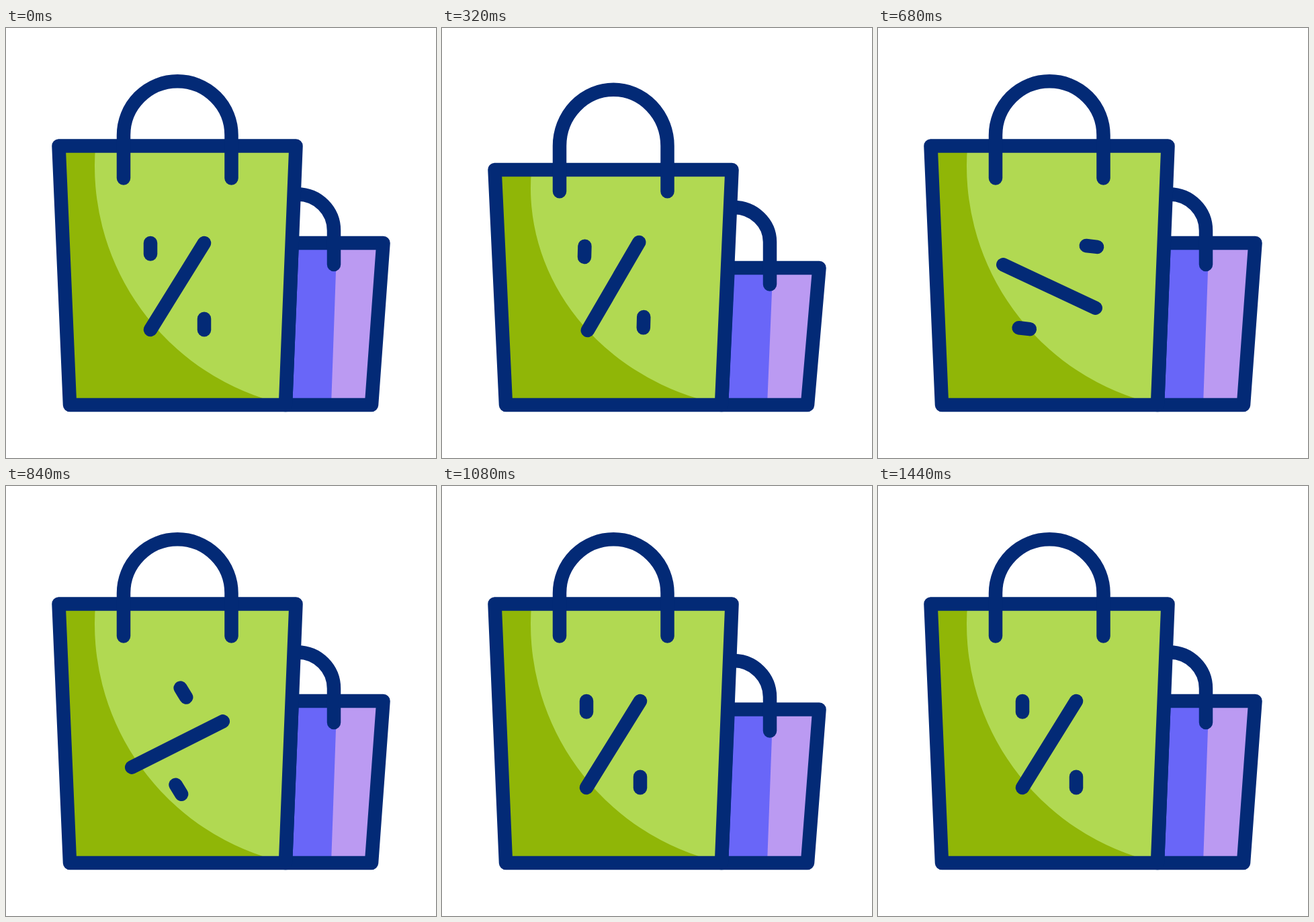
Recreate the animation shown at these times as an HTML page. Size 640x640 px, loop 1.48 s.

```html
<!DOCTYPE html>
<html lang="en">
<head>
<meta charset="utf-8">
<title>Shopping bags</title>
<style>
  html, body { margin: 0; width: 100%; height: 100%; overflow: hidden; background: #fff; }
  svg { display: block; width: 640px; height: 640px; }
  .line { fill: none; stroke: #032a76; stroke-width: 20.5; stroke-linecap: round; stroke-linejoin: round; }
  .fixed { vector-effect: non-scaling-stroke; }
  .spark { fill: none; stroke: #b1d952; stroke-width: 21.5; stroke-linecap: round; }
</style>
</head>
<body>
<svg viewBox="0 0 640 640">
  <g id="smallBody">
    <path fill="#6966f8" d="M425.7 320H561.5L544 561H416Z"/>
    <path fill="#bb9af2" d="M492.5 320H561.5L544 561H484Z"/>
    <path class="line fixed" d="M425.7 320H561.5L544 561H416Z"/>
  </g>
  <path id="smallHandle" class="line"/>
  <g id="bigBody">
    <path fill="#b1d952" d="M78.5 175.5H431.5L416 561H95Z"/>
    <path fill="#90b607" d="M78.5 175.5H133.2A364 364 0 0 0 382 551L408 561H95Z"/>
    <path class="line fixed" d="M78.5 175.5H431.5L416 561H95Z"/>
  </g>
  <path id="bigHandle" class="line"/>
  <g id="percent">
    <path id="slash" class="line" d="M295 320L215 449"/>
    <path id="dotA" class="line" d="M0 -8.2V8.2"/>
    <path id="dotB" class="line" d="M0 -8.2V8.2"/>
  </g>
  <g id="sparks"></g>
</svg>
<script>
const LOOP = 1480, STEP = 40;
const $ = id => document.getElementById(id);
const set = (id, name, value) => $(id).setAttribute(name, value);

const smooth = u => u * u * (3 - 2 * u);
const out = u => 1 - (1 - u) ** 2;
const ramp = (t, from, to, ease = smooth) =>
  ease(Math.min(1, Math.max(0, (t - from) / (to - from))));
const bump = (t, from, peak, to, fall = smooth) =>
  t < peak ? ramp(t, from, peak) : 1 - ramp(t, peak, to, fall);

// Moves the rim and the base of a bag independently.
function squash(id, rim, base, dRim, dBase) {
  const k = 1 + (dBase - dRim) / (base - rim);
  set(id, 'transform', `matrix(1 0 0 ${k} 0 ${rim + dRim - rim * k})`);
}

function drawBig(t) {
  const jump = -55 * bump(t, 100, 200, 310);
  const lift = -25 * bump(t, 100, 200, 275);
  const land = bump(t, 200, 310, 660, out);
  const slowLand = bump(t, 200, 310, 660);
  squash('bigBody', 175.5, 561, jump + 37.5 * land, lift);

  const top = 79.25 + jump + 12.5 * slowLand;
  const mid = 159.5 + jump + 17 * land;
  const end = 223.5 + jump + 21 * land;
  set('bigHandle', 'd', `M175 ${end}V${mid}A80.25 ${mid - top} 0 0 1 335.5 ${mid}V${end}`);
  set('percent', 'transform', `translate(0 ${lift})`);
}

function drawSmall(t) {
  const shake = bump(t, 220, 320, 430, out);
  const hop = -25 * bump(t, 860, 960, 1170) + 37 * bump(t, 960, 1170, 1440, out);
  const lift = -10.5 * bump(t, 860, 960, 1050);
  squash('smallBody', 320, 561, hop + 37 * shake, lift);

  const top = 247.5 + hop + 19.5 * shake;
  const mid = 301.5 + hop + 17 * shake;
  const end = 352 + hop + 29.5 * shake;
  set('smallHandle', 'd', `M430 ${top}H434A54 ${mid - top} 0 0 1 488 ${mid}V${end}`);
}

// The dots trade places, each pausing halfway.
const upper = [215, 328.3], lower = [295, 441];
const routes = {
  dotA: [upper, [172, 396], [217, 447], [265, 459], lower],
  dotB: [lower, [372, 399], [319, 325.5], [251, 288], upper]
};

function drawPercent(t) {
  const start = 278, half = 660, stop = 1044;
  const angle = 180 * ramp(t, start, stop);
  set('slash', 'transform', `rotate(${-angle} 255 384.5)`);

  const u = t < half ? ramp(t, start, half) : ramp(t, half, stop);
  for (const id in routes) {
    const [a, b, c] = routes[id].slice(t < half ? 0 : 2);
    const [x, y] = [0, 1].map(k => (1 - u) ** 2 * a[k] + 2 * u * (1 - u) * b[k] + u * u * c[k]);
    set(id, 'transform', `translate(${x} ${y}) rotate(${angle})`);
  }
}

// A burst is a fan of three rays around its heading.
const bursts = [
  { x: 77, y: 243, heading: 164, delay: 0 },
  { x: 445, y: 251, heading: 2, delay: 0 },
  { x: 508, y: 287, heading: -71, delay: 760 }
];
const SPREAD = 56, NEAR = 20, FAR = 60;

for (const burst of bursts) {
  burst.rays = [-1, 0, 1].map(side => {
    const el = document.createElementNS('http://www.w3.org/2000/svg', 'path');
    const angle = burst.heading + side * SPREAD;
    el.setAttribute('class', 'spark');
    el.setAttribute('transform', `translate(${burst.x} ${burst.y}) rotate(${angle})`);
    $('sparks').append(el);
    return { el, lag: side ? 0 : 5 };
  });
}

function drawSparks(t) {
  for (const { delay, rays } of bursts) {
    const s = t - delay;
    const head = NEAR + (FAR - NEAR) * ramp(s, 340, 520, out);
    const tail = NEAR + (FAR - NEAR) * ramp(s, 365, 560);
    for (const { el, lag } of rays) {
      el.style.display = s > 340 && head > tail ? '' : 'none';
      el.setAttribute('d', `M${tail - lag} 0H${head}`);
    }
  }
}

function draw(t) {
  drawSmall(t);
  drawBig(t);
  drawPercent(t);
  drawSparks(t);
}

const begin = performance.now();
function tick() {
  const t = (performance.now() - begin) % LOOP;
  draw(Math.floor(t / STEP) * STEP);
  requestAnimationFrame(tick);
}
tick();
</script>
</body>
</html>
```
